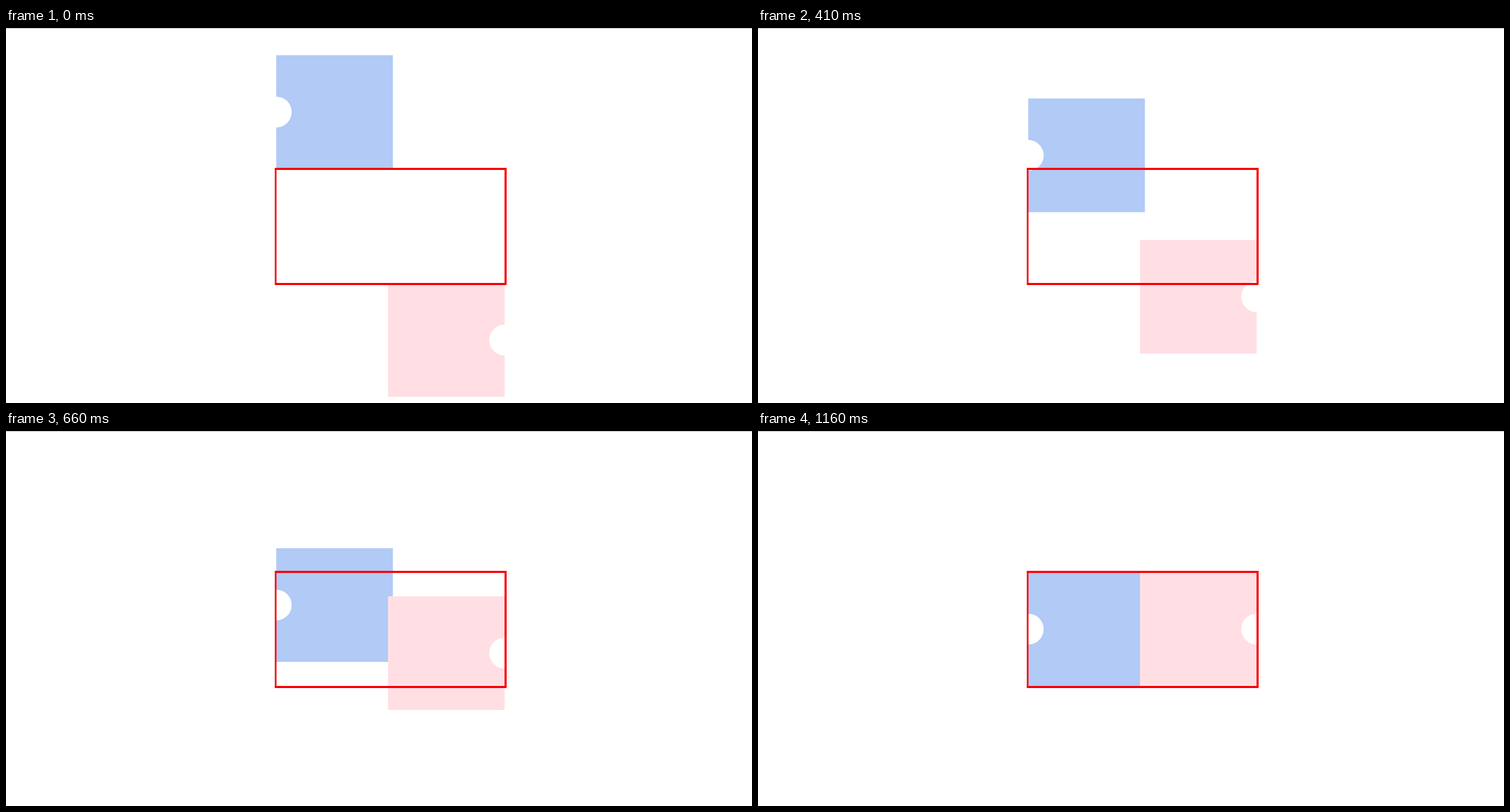
An HTML page with a canvas that plays this animation: 1055x531 px, repeating every 1.92 s.

```html
<!DOCTYPE html>
<html lang="en">
<head>
<meta charset="utf-8">
<title>Sliding tiles</title>
<style>
  html, body { margin: 0; width: 100%; height: 100%; overflow: hidden; background: #fff; }
  canvas { display: block; }
</style>
</head>
<body>
<canvas id="stage" width="1055" height="531"></canvas>
<script>
const ctx = document.getElementById('stage').getContext('2d');

const LOOP = 1920, START = 173, DURATION = 1000;
const STEP = 50, STEP_OFFSET = 10;
const TILE_W = 165, TILE_H = 161, NOTCH_R = 21.8;
const END_Y = 280.5;

const tiles = [
  { x: 382.2, notchX: 382.2, fromY: 119, color: '#b1caf6' },
  { x: 540.2, notchX: 705.2, fromY: 441.8, color: '#ffdfe4' }
];

const bezier = (a, b, u) =>
  3 * a * u * (1 - u) ** 2 + 3 * b * u * u * (1 - u) + u ** 3;

// The standard "ease" curve: cubic-bezier(.25, .1, .25, 1)
function ease(x) {
  if (x <= 0) return 0;
  if (x >= 1) return 1;
  let lo = 0, hi = 1;
  for (let i = 0; i < 30; i++) {
    const mid = (lo + hi) / 2;
    if (bezier(0.25, 0.25, mid) < x) lo = mid;
    else hi = mid;
  }
  return bezier(0.1, 1, lo);
}

function fill(color, x, y, w, h) {
  ctx.fillStyle = color;
  ctx.fillRect(x, y, w, h);
}

function drawTile({ x, notchX, fromY, color }, progress) {
  const y = fromY + (END_Y - fromY) * progress;
  fill(color, x, y - TILE_H / 2, TILE_W, TILE_H);
  ctx.fillStyle = '#fff';
  ctx.beginPath();
  ctx.arc(notchX, y, NOTCH_R, 0, 2 * Math.PI);
  ctx.fill();
}

function drawFrame() {
  const red = '#f90006';
  fill(red, 380.2, 198, 327.4, 3);
  fill(red, 380.2, 361, 327.4, 3);
  fill(red, 380.2, 198, 2.3, 166);
  fill(red, 705, 198, 3, 165);
}

function draw(time) {
  const t = time % LOOP;
  // Motion advances in discrete steps
  const stepped = Math.floor((t - STEP_OFFSET) / STEP) * STEP + STEP_OFFSET;
  const progress = ease((stepped - START) / DURATION);
  fill('#fff', 0, 0, 1055, 531);
  fill('#c8c8c8', 0, 0, 1055, 1);
  for (const tile of tiles) drawTile(tile, progress);
  drawFrame();
}

const begin = performance.now();
function tick() {
  draw(performance.now() - begin);
  requestAnimationFrame(tick);
}
tick();
</script>
</body>
</html>
```
